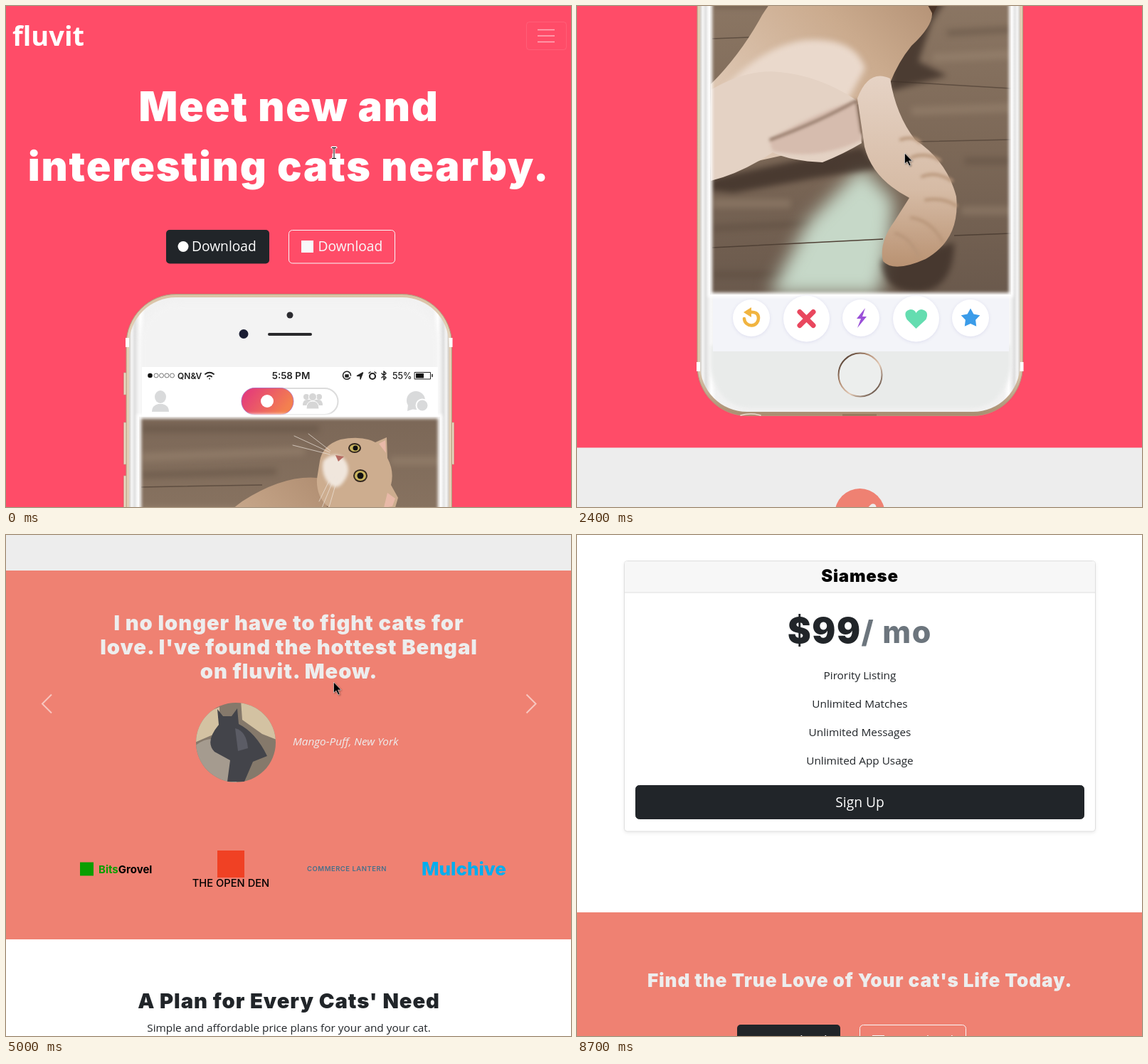
An HTML page for the animation above (9.3 s loop, 794 by 705 pixels).

```html
<!DOCTYPE html>
<html lang="en">
<head>
<meta charset="utf-8">
<title>Cat dating landing page</title>
<style>
html, body { margin: 0; width: 100%; height: 100%; overflow: hidden; background: #fff; }
svg { display: block; width: 794px; height: 705px; }
text { font-family: "Open Sans", "Noto Sans", sans-serif; font-size: 15.35px; fill: #212529; }
.m { text-anchor: middle; }
.h { font-family: Inter, "Open Sans", sans-serif; font-weight: 900; letter-spacing: .032em; text-anchor: middle; }
.h1 { font-size: 57.3px; fill: #fff; }
.h2 { font-size: 29.2px; }
.h3 { font-size: 26.2px; }
.h4 { font-size: 24px; fill: #000; }
.price { font-size: 49px; }
.mo { font-size: 43px; font-weight: 800; fill: #6c757d; }
.black { fill: #000; }
.pale { fill: #ededed; }
.sub { fill: #8f8f8f; text-anchor: middle; }
.btn { font-size: 19.2px; }
.brand { font-size: 38px; font-weight: 700; fill: #fff; }
.status { font-family: Inter, Roboto, sans-serif; font-size: 13px; font-weight: 600; fill: #222; }
.press { font-family: Inter, sans-serif; }
.card { filter: drop-shadow(0 2px 2px rgba(0,0,0,.075)); }
.line { fill: none; stroke-linecap: round; stroke-linejoin: round; }
.soft2 { filter: blur(2px); }
.soft4 { filter: blur(4px); }
.soft12 { filter: blur(12px); }
</style>
</head>
<body>
<svg viewBox="0 0 794 705">
<defs>
  <linearGradient id="gold" x2="0" y2="1"><stop stop-color="#d9c3a5"/><stop offset=".06" stop-color="#e3d0b8"/><stop offset=".93" stop-color="#dcc7ae"/><stop offset="1" stop-color="#a88d70"/></linearGradient>
  <linearGradient id="bezel" x2="1"><stop stop-color="#cfcac4"/><stop offset=".008" stop-color="#f6f6f6"/><stop offset=".018" stop-color="#dedede"/><stop offset=".035" stop-color="#fff"/><stop offset=".05" stop-color="#f2f2f2"/><stop offset=".95" stop-color="#f2f2f2"/><stop offset=".965" stop-color="#fff"/><stop offset=".982" stop-color="#dedede"/><stop offset=".992" stop-color="#f6f6f6"/><stop offset="1" stop-color="#cfcac4"/></linearGradient>
  <linearGradient id="pill" x2="1" y2=".4"><stop stop-color="#e2337f"/><stop offset="1" stop-color="#f3804f"/></linearGradient>
  <linearGradient id="wood" x2="0" y2="1"><stop stop-color="#7b6757"/><stop offset=".3" stop-color="#8b7663"/><stop offset=".65" stop-color="#7c6857"/><stop offset="1" stop-color="#6a594c"/></linearGradient>
  <linearGradient id="fur" x1="1" y1="0" x2="0" y2="1"><stop stop-color="#a9866a"/><stop offset=".4" stop-color="#cbab8e"/><stop offset="1" stop-color="#e6d3c3"/></linearGradient>
  <linearGradient id="tail" x2="0" y2="1"><stop stop-color="#e6d3c5"/><stop offset=".6" stop-color="#d6bba5"/><stop offset="1" stop-color="#b99272"/></linearGradient>
  <linearGradient id="ring" x2="1" y2="1"><stop stop-color="#2a1d17"/><stop offset=".35" stop-color="#b08b72"/><stop offset=".6" stop-color="#e3c9b5"/><stop offset="1" stop-color="#35251d"/></linearGradient>
  <clipPath id="photo"><rect x="187" y="318" width="423" height="590"/></clipPath>
  <clipPath id="face"><circle cx="323" cy="675" r="56"/></clipPath>
  <g id="downloads">
    <rect x="225" y="315" width="145" height="47.500" rx="5" fill="#212529"/>
    <circle cx="249" cy="338.500" r="7.500" fill="#fff"/>
    <text class="btn" x="261" y="345" style="fill:#fff">Download</text>
    <rect x="397.500" y="315.500" width="149" height="46.500" rx="5" fill="none" stroke="#f8f9fa"/>
    <rect x="415" y="330" width="17" height="17" fill="#f8f9fa"/>
    <text class="btn" x="438.500" y="345" style="fill:#f8f9fa">Download</text>
  </g>
</defs>

<g id="page">
  <path fill="#ff4c68" d="M0 0H794V1384H0z"/>
  <path fill="#ededed" d="M0 1383.500H794V1968H0z"/>
  <path fill="#ef8172" d="M0 1968H794V2487H0zM0 3968H794V4400H0z"/>
  <path fill="#fff" d="M0 2487H794V3968H0z"/>

  <!-- hero -->
  <text class="brand" x="9" y="56">fluvit</text>
  <rect x="731.500" y="22.500" width="56" height="39" rx="4" fill="none" stroke="#fff" stroke-opacity=".1"/>
  <path d="M747 33.500h24M747 42h24M747 50.500h24" stroke="#fff" stroke-opacity=".55" stroke-width="1.700"/>
  <text class="h h1" x="397.500" y="162">Meet new and</text>
  <text class="h h1" x="397.500" y="246">interesting cats nearby.</text>
  <use href="#downloads"/>

  <!-- phone -->
  <path fill="#e9d8c2" stroke="#b99f80" stroke-width=".6" d="M165.500 516h4v31h-4zM165.500 586h4v59h-4zM165.500 661h4v57h-4zM626 586h3.500v59h-3.500z"/>
  <rect x="169" y="405.500" width="457.500" height="933" rx="70" fill="url(#gold)" stroke="#b3987a"/>
  <path fill="#fff" d="M168 467h5v13h-5zM622.500 467h5v13h-5zM168 1263h5v13h-5zM622.500 1263h5v13h-5z"/>
  <rect x="173" y="410" width="449.500" height="923" rx="66" fill="url(#bezel)"/>
  <rect x="188" y="418" width="420" height="907" rx="56" fill="#f3f3f3" class="soft4"/>
  <path fill="#e9ebea" d="M188 1240H609V1270Q600 1326 555 1328H243Q197 1326 188 1270z" class="soft2"/>
  <path fill="#8e7458" d="M373 1336.500h48v2h-48z"/>
  <path class="line" stroke="#eadfd3" stroke-width="1.500" d="M230 1338q14-4 28 0"/>
  <circle cx="399" cy="435" r="4.500" fill="#2b2b30"/>
  <circle cx="334" cy="461.500" r="6.500" fill="#1a1d33"/>
  <path class="line" d="M370 462h58" stroke="#29292c" stroke-width="4"/>
  <path fill="#fff" d="M191 508H607V583H191z"/>
  <path fill="#f3f4f9" d="M191 1167H607V1248H191z"/>

  <!-- status bar -->
  <circle cx="202.500" cy="520" r="3.300" fill="#111"/>
  <g fill="none" stroke="#777"><circle cx="211" cy="520" r="3"/><circle cx="218.500" cy="520" r="3"/><circle cx="226" cy="520" r="3"/><circle cx="233.500" cy="520" r="3"/></g>
  <text class="status" x="241" y="525" style="font-size:12px">QN&amp;V</text>
  <g class="line" stroke="#222" stroke-width="2"><path d="M280 518q6-4.500 12 0M283 521.500q3-2.500 6 0"/><path d="M286 524.500v.1"/></g>
  <text class="status m" x="400.500" y="525" style="font-size:13.400px">5:58 PM</text>
  <g class="line" stroke="#222" stroke-width="1.500">
    <path d="M483.500 523a5.500 5.500 0 1 1 1-3"/><path d="M477 519h4v3h-4z" fill="#222"/>
    <path d="M493.500 520.500l8-4.500-3.500 9v-4.500z" fill="#222"/>
    <circle cx="515" cy="521" r="4" stroke-width="2.200"/><path d="M510 516.500l2-1.500M520 516.500l-2-1.500"/>
    <path d="M528 517l6 6-3 3v-12l3 3-6 6"/>
    <path d="M574.500 515.500h22v9.500h-22z" stroke-width="1"/><path d="M599 518.500v3"/>
  </g>
  <path d="M576 517h11v6.500h-11z" fill="#111"/>
  <text class="status" x="543" y="525" style="font-size:12.500px;font-weight:500">55%</text>

  <!-- app bar -->
  <g fill="#d9dadb">
    <ellipse cx="217" cy="550" rx="8" ry="9"/><path d="M205 571q0-9 9-11h6q9 2 9 11z"/>
    <circle cx="576" cy="555" r="13"/><path d="M565 561l-1 9 9-3z"/>
    <circle cx="585" cy="562" r="8.500" stroke="#fff" stroke-width="2"/>
  </g>
  <rect x="331.500" y="538" width="135" height="37" rx="18.500" fill="#fff" stroke="#dcdcdc" stroke-width="2"/>
  <rect x="331" y="537.500" width="73" height="37.500" rx="18.500" fill="url(#pill)" stroke="#a45dc0" stroke-width=".7"/>
  <circle cx="367" cy="556" r="9" fill="#fff"/>
  <g fill="#d6d6d6"><circle cx="422" cy="550" r="4"/><circle cx="440" cy="550" r="4"/><path d="M417 562q0-8 6-8h16q6 0 6 8z"/><g stroke="#fff"><circle cx="431" cy="550" r="5.500"/><path d="M422 567q0-11 9-11t9 11z"/></g></g>

  <!-- photo -->
  <g transform="translate(0 260)" clip-path="url(#photo)">
    <path fill="url(#wood)" d="M186 316H612V910H186z"/>
    <g class="soft4" stroke="#a8937d" stroke-width="12" opacity=".35"><path d="M190 375L420 366M190 450H330M540 380H610M500 575L610 570M470 650L610 645M190 780H300M540 790H610"/></g>
    <g class="soft4" stroke="#55463a" stroke-width="9" opacity=".4"><path d="M190 335H440M190 400L380 395M190 500H280M550 470H610M520 540L610 535M190 815L330 808M190 880H400M545 720H610"/></g>
    <g stroke="#4f4035" stroke-width="1.500" opacity=".7"><path d="M190 417L360 414M190 548L270 545M440 608L610 618M470 693L610 690"/></g>
    <path class="soft12" fill="#c6d8c8" d="M270 908L325 805 400 728 445 775 440 830 425 908z"/>
    <path stroke="#4f4035" stroke-width="1.500" d="M190 842L430 830M530 825L610 822"/>
    <path class="soft4" fill="#3e3028" opacity=".8" d="M440 455L540 460 498 525 480 580 520 600 440 622zM188 745L400 700 425 730 330 745 220 765 188 762zM428 860Q430 905 480 905 530 900 530 835z"/>
    <path fill="#4a3427" d="M435 425Q500 475 530 456L498 518 455 480z"/>
    <path fill="url(#fur)" d="M188 612Q230 570 260 515 290 468 332 437 390 400 437 404L455 455Q480 475 499 512 500 530 470 558 452 580 440 610L395 640 290 712 188 735z"/>
    <path class="soft4" fill="#ead9cc" d="M188 640Q250 560 320 550 390 545 405 590L380 635Q330 660 270 700L188 730z"/>
    <path fill="#e4d2c4" d="M188 620Q240 590 285 595 340 600 392 634L400 695Q375 710 345 722 300 720 275 708 230 738 188 748z"/>
    <path class="soft2" fill="#d6bcae" d="M270 690Q340 650 393 634L401 690Q340 720 275 706z"/>
    <path class="line soft2" stroke="#7d6352" stroke-width="3" d="M272 690Q340 665 393 635L400 680"/>
    <path fill="url(#tail)" d="M394 632Q410 590 440 604 448 655 475 690 520 720 533 770 539 830 490 858 445 878 430 861 424 835 446 805L467 772Q415 745 404 700z"/>
    <g class="line soft2" stroke="#b8967a" stroke-width="4"><path d="M455 690q18-6 27 4M470 715q20-8 40 4M485 742q20-8 42 6M490 775q25-4 43 8M470 800q28 4 44 34M448 822q20 6 32 32"/></g>
    <path fill="#cdad8f" d="M441 380Q445 358 470 350 500 344 519 354L535 347 536 376Q546 395 541 414L551 432 546 449 523 455Q500 470 470 456 435 440 437 405z"/>
    <path fill="#e8b9a8" d="M524 356l9-5 1 18zM536 425l11 8-4 11-12 2z"/>
    <path class="soft2" fill="#f0e6dc" d="M446 380q14-14 28-4 14 16 0 34-10 14-22 0-10-14-6-30z"/>
    <g fill="#c9b45f" stroke="#33271f" stroke-width="2"><ellipse cx="490" cy="362" rx="8" ry="6"/><ellipse cx="498" cy="401" rx="9" ry="8"/></g>
    <circle cx="491" cy="362" r="3.500" fill="#111"/><circle cx="498" cy="401" r="4.500" fill="#111"/>
    <path fill="#b66b62" d="M463 372l12 2-8 7z"/>
    <path class="line" stroke="#eee6dd" opacity=".7" d="M455 368L405 345M456 366L425 342M455 371L403 358M458 400L440 437M462 402L444 446M466 404L452 452"/>
  </g>
  <rect class="soft2" x="187" y="577.500" width="423" height="591" fill="none" stroke="#fff" stroke-width="6"/>

  <!-- action buttons -->
  <g transform="translate(0 762)">
    <g fill="#fff" style="filter:drop-shadow(0 1px 2px #dde)"><circle cx="245" cy="439" r="26"/><circle cx="322.500" cy="440" r="32.500"/><circle cx="399" cy="439" r="26"/><circle cx="476.500" cy="440" r="32.500"/><circle cx="553" cy="439" r="26"/></g>
    <path class="line" stroke="#f1b440" stroke-width="4.500" d="M241 431q14-2 14 8a10 10 0 0 1-20 1"/><path fill="#f1b440" d="M234 431l11-7v14z"/>
    <path class="line" stroke="#e9475e" stroke-width="7" d="M313 430.500l19 19M332 430.500l-19 19"/>
    <path fill="#9a50d8" d="M405 425l-12 15h6l-5 13 13-16h-6z"/>
    <path fill="#64ddb0" d="M476.500 454l-13-13q-6-12 5-14 6 0 8 5 3-5 8-5 11 2 6 14z"/>
    <path id="star" fill="#3b9ce9"/>
    <circle cx="398" cy="519" r="30.500" fill="#eceeed" stroke="url(#ring)" stroke-width="2"/>
  </g>

  <!-- features and testimonial -->
  <g transform="translate(0 1535)">
    <g fill="#ef8172">
      <circle cx="397.500" cy="-59" r="35"/>
      <path d="M397.500 288q-3 0-6-3l-24-25q-11-13-2-27 6-9 17-9 9 0 15.500 8 6.500-8 15.500-8 11 0 17 9 9 14-2 27l-24 25q-4 3-7 3z"/>
    </g>
    <path class="line" stroke="#ededed" stroke-width="9" d="M380-58l13 13 23-23"/>
    <g fill="none" stroke="#ef8172" stroke-width="9"><circle cx="397.500" cy="98.500" r="30.500"/><circle cx="397.500" cy="98.500" r="13.500"/></g>
    <text class="h h3 black" x="397.500" y="8.500">Easy to use.</text>
    <text class="sub" x="397.500" y="40.500">So easy to use, even your cat could do it.</text>
    <text class="h h3 black" x="397.500" y="166">Elite Clientele</text>
    <text class="sub" x="397.500" y="198">We have all the cats, the greatest cats.</text>
    <text class="h h3 black" x="397.500" y="323.500">Guaranteed to work.</text>
    <text class="sub" x="397.500" y="355.500">Find the love of your cat's life or your money back.</text>
    <text class="h h2 pale" x="397.500" y="517">I no longer have to fight cats for</text>
    <text class="h h2 pale" x="397.500" y="551">love. I've found the hottest Bengal</text>
    <text class="h h2 pale" x="397.500" y="585">on fluvit. Meow.</text>
    <path fill="none" stroke="#fff" stroke-opacity=".55" stroke-width="2" d="M64 607.500L51 620.500 64 633.500M731.500 607.500L744.500 620.500 731.500 633.500"/>
    <g clip-path="url(#face)">
      <path fill="#85796b" d="M260 615h130v120H260z"/>
      <path fill="#d3c2a2" d="M330 615h60v60l-30-12-28-20zM265 640l35-15v35l-35 15z"/>
      <path fill="#a59b8f" d="M265 680q25-20 50 0l10 55h-60z"/>
      <path fill="#43444a" d="M297 628l8 10h12l8-11 2 22q24 12 40 45l-20 8-12 28h-24l4-30-22-12q-14-14 6-38z"/>
      <path fill="#5b5c65" d="M322 655q16 4 18 28l-14 4z"/>
    </g>
    <text class="pale" x="403" y="679" font-style="italic">Mango-Puff, New York</text>
  </g>

  <!-- press and pricing -->
  <g transform="translate(0 2320)">
    <path fill="#0a9e01" d="M104 58.500h19v19h-19z"/>
    <text class="press" x="130" y="73.500" style="font-size:15px;font-weight:700;fill:#0a9e01">Bits<tspan class="black">Grovel</tspan></text>
    <path fill="#f04124" d="M297 42h38v38h-38z"/>
    <text class="press m black" x="316" y="93" style="font-size:14.700px;font-weight:500">THE OPEN DEN</text>
    <text class="press m" x="479" y="71" style="font-size:9.500px;font-weight:600;letter-spacing:.5px;fill:#47708a">COMMERCE LANTERN</text>
    <text class="press m" x="643.500" y="76.500" style="font-size:26px;font-weight:800;fill:#00aeef">Mulchive</text>
    <text class="h h2" x="397.500" y="264">A Plan for Every Cats' Need</text>
    <text class="m" x="397.500" y="296.500">Simple and affordable price plans for your and your cat.</text>
  </g>
  <g id="cards"></g>

  <!-- closing call -->
  <g transform="translate(0 3437)">
    <text class="h h3 pale" x="397.500" y="636">Find the True Love of Your cat's Life Today.</text>
    <use href="#downloads" y="374"/>
  </g>
</g>

<g id="beam"><path class="line" stroke="#fff" stroke-width="3" d="M458 199h6M461 199v16M458 215h6"/><path stroke="#000" fill="none" d="M458 199.500h6M461 199v16M458 214.500h6"/></g>
<path id="arrow" d="M0 0V15L3.500 12 6.500 18 8.500 17 6 11H10.500z" stroke="#fff" stroke-opacity=".7" stroke-width=".8" style="filter:drop-shadow(1px 1px 1px #0006)"/>
</svg>

<script>
const $ = id => document.getElementById(id);

const card = (top, title, price, unit, lines, dark) => {
  const extra = (lines.length - 3) * 40;
  return `<g transform="translate(0 ${top})">
    <rect class="card" x="66.5" y=".5" width="662" height="${340.5 + extra}" rx="4" fill="#fff" stroke="#dfdfdf"/>
    <path d="M67 45V4q0-3 3-3h655q3 0 3 3v41z" fill="#f7f7f7"/>
    <path d="M67 45h661" stroke="#dfdfdf"/>
    <text class="h h4" x="397.5" y="30">${title}</text>
    <text class="h price" x="397.5" y="115.5">${price}<tspan class="mo">${unit}</tspan></text>
    ${lines.map((s, i) => `<text class="m" x="397.5" y="${166.5 + i * 40}">${s}</text>`).join("")}
    <rect x="82.5" y="${276.5 + extra}" width="630" height="47" rx="5" fill="${dark ? "#212529" : "#fff"}" stroke="#212529"/>
    <text class="m btn" x="397.5" y="${307 + extra}" ${dark ? 'style="fill:#fff"' : ""}>Sign Up</text></g>`;
};
const unlimited = ["Unlimited Matches", "Unlimited Messages", "Unlimited App Usage"];
$("cards").innerHTML =
  card(2659, "Munchkin", "Free", "", ["5 Matches Per Day", "10 Messages Per Day", unlimited[2]], false) +
  card(3066, "Tabby", "$48", "/ mo", unlimited, true) +
  card(3473, "Siamese", "$99", "/ mo", ["Pirority Listing", ...unlimited], true);

$("star").setAttribute("d", "M" + Array.from({ length: 10 }, (_, i) => {
  const r = i % 2 ? 7.5 : 14, a = i * Math.PI / 5;
  return [553 + r * Math.sin(a), 439.5 - r * Math.cos(a)].map(v => v.toFixed(1));
}).join("L") + "z");

// [time, scroll position]
const scroll = [[500, 0], [600, 20], [1000, 260], [1500, 560], [1700, 610],
  [2100, 610], [2200, 640], [2400, 762], [2900, 1110], [3100, 1185],
  [3500, 1185], [3600, 1230], [4000, 1535], [4200, 1660], [4300, 1680],
  [4600, 1680], [4700, 1710], [5500, 2265], [5800, 2320],
  [6100, 2320], [6200, 2360], [6900, 2947], [7000, 2970],
  [7200, 2970], [7300, 3060], [7500, 3400], [7600, 3437]];
const cursorX = [[8300, 460.5], [8600, 121]];
const cursorY = [[8300, 207], [8600, 1], [8700, -40]];

function at(keys, t) {
  const i = keys.findIndex(k => k[0] > t);
  if (i < 0) return keys[keys.length - 1][1];
  if (!i) return keys[0][1];
  const [t0, a] = keys[i - 1], [t1, b] = keys[i];
  return a + (b - a) * (t - t0) / (t1 - t0);
}

const start = performance.now();
function draw() {
  const t = Math.floor((performance.now() - start) % 9300 / 100) * 100;
  const reading = t < 1700;
  $("page").setAttribute("transform", `translate(0 ${-Math.round(at(scroll, t))})`);
  $("beam").style.display = reading ? "" : "none";
  $("arrow").style.display = reading ? "none" : "";
  $("arrow").setAttribute("transform", `translate(${at(cursorX, t)} ${at(cursorY, t)})`);
  requestAnimationFrame(draw);
}
draw();
</script>
</body>
</html>
```
